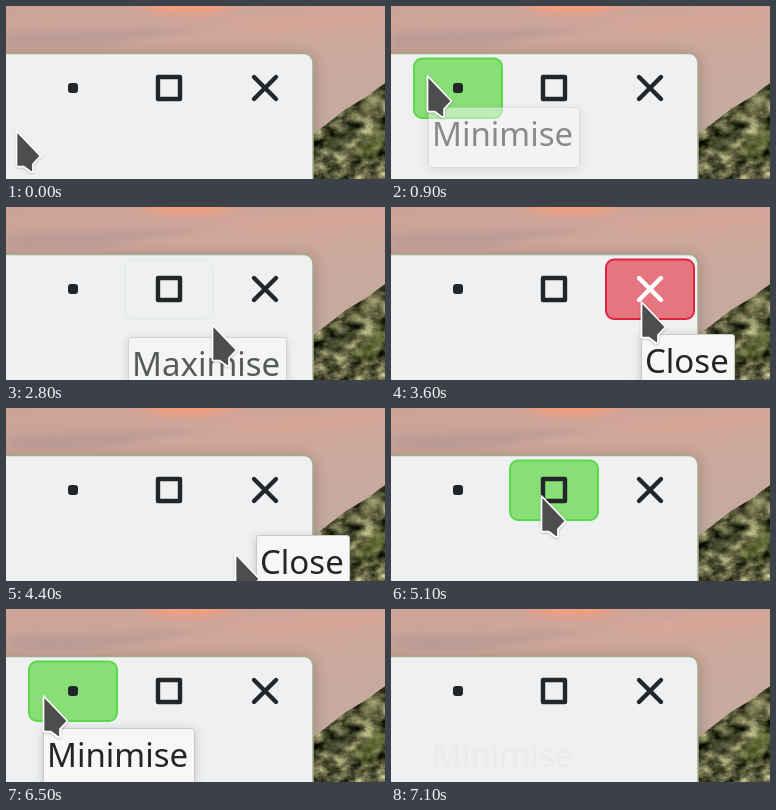
Recreate the animation shown at these times as an HTML page. Size 379x173 px, loop 7.3 s.

```html
<!DOCTYPE html>
<html lang="en">
<head>
<meta charset="utf-8">
<title>Window buttons</title>
<style>
  html, body { margin: 0; width: 100%; height: 100%; overflow: hidden; background: #cba59d; }
  svg { display: block; width: 379px; height: 173px; }
  text { font: 33px "Noto Sans", sans-serif; fill: #232629; }
  .btn { fill: #88df76; stroke: #5dd74b; stroke-width: 2; }
  #close { fill: #e5757f; stroke: #dd2440; }
  .icon { fill: none; stroke: #232629; stroke-width: 4.4; stroke-linejoin: round; }
</style>
</head>
<body>
<svg viewBox="0 0 379 173">
  <defs>
    <linearGradient id="sky" x2=".3" y2="1">
      <stop offset="0" stop-color="#cda297"/>
      <stop offset=".35" stop-color="#cfa79b"/>
      <stop offset="1" stop-color="#c2aca3"/>
    </linearGradient>
    <filter id="soft" x="-20%" y="-100%" width="140%" height="300%"><feGaussianBlur stdDeviation="9 3"/></filter>
    <filter id="blur"><feGaussianBlur stdDeviation="3"/></filter>
    <filter id="glow" x="-10%" y="-20%" width="120%" height="140%"><feGaussianBlur stdDeviation="8"/></filter>
    <filter id="rock" color-interpolation-filters="sRGB">
      <feTurbulence type="fractalNoise" baseFrequency=".07 .09" numOctaves="4" seed="5"/>
      <feColorMatrix values="1.3 0 0 0 -.28  1.25 0 0 0 -.25  1 0 0 0 -.25  0 0 0 0 1"/>
      <feComposite in2="SourceAlpha" operator="in"/>
    </filter>
    <filter id="drop" x="-20%" y="-20%" width="140%" height="150%">
      <feDropShadow dx="0" dy="1" stdDeviation="1" flood-opacity=".25"/>
    </filter>
    <filter id="lift" x="-20%" y="-30%" width="140%" height="170%">
      <feDropShadow dx="0" dy="2" stdDeviation="5" flood-opacity=".2"/>
    </filter>
  </defs>

  <rect width="379" height="173" fill="url(#sky)"/>
  <g filter="url(#soft)">
    <path d="M130 -4H240L205 8L150 7Z" fill="#ef9f80"/>
    <path d="M215 16L379 4V14L260 26Z" fill="#d9a697"/>
    <path d="M0 26L200 22L90 40H0Z" fill="#bb9b95"/>
  </g>
  <path d="M300 134L318 120L340 103L360 91L379 77V173H300Z" filter="url(#rock)"/>
  <g filter="url(#blur)">
    <path d="M379 82L340 108L350 114L379 98Z" fill="#8f8c5e" opacity=".5"/>
    <path d="M318 132L352 110L350 130L322 152Z" fill="#22291a" opacity=".5"/>
    <path d="M379 112L346 148L362 154L379 138Z" fill="#6f7d38" opacity=".5"/>
  </g>

  <rect x="-20" y="50" width="327" height="150" rx="9" fill="#202018" opacity=".32" filter="url(#glow)"/>
  <rect x="-20" y="47.5" width="327" height="150" rx="9" fill="#eff0f1" stroke="#a3ad8c" stroke-width="1.5"/>

  <rect id="min" class="btn" x="23" y="52.500" width="88" height="59.500" rx="8"/>
  <rect id="max" class="btn" x="119" y="52.500" width="88" height="59.500" rx="8"/>
  <rect id="close" class="btn" x="215" y="52.500" width="88" height="59.500" rx="8"/>
  <rect x="62" y="77" width="10" height="10" rx="3" fill="#232629"/>
  <rect class="icon" x="152" y="71" width="22" height="22"/>
  <path id="cross" class="icon" stroke-linecap="round" d="M248 71L270 93M270 71L248 93"/>

  <g id="tip">
    <rect id="box" x=".5" y=".5" height="60" rx="2.500" fill="#f7f7f7" stroke="#c8c9ca" filter="url(#lift)"/>
    <text id="label" x="4" y="39"></text>
  </g>
  <path id="cursor" d="M0 0V35.500H7L14.500 41H16.500V33L24 25Z" fill="#4d4d4d" stroke="#fff" stroke-width="1.700" stroke-linejoin="round" filter="url(#drop)"/>
</svg>
<script>
  const LOOP = 7300, STEP = 100, FADE = 160, MORPH = 200;
  const el = id => document.getElementById(id);
  const clamp = v => Math.min(1, Math.max(0, v));
  const mix = (a, b, p) => a + (b - a) * p;
  const smooth = p => p * p * (3 - 2 * p);
  const easeOut = p => 1 - (1 - p) ** 2.25;

  // The pointer glides from stop to stop and rests between arrive and leave.
  const stops = [
    { arrive: 0, leave: 0, x: 10, y: 125 },
    { arrive: 600, leave: 900, x: 36, y: 70 },
    { arrive: 1600, leave: 2700, x: 147, y: 111 },
    { arrive: 2800, leave: 2800, x: 206, y: 118 },
    { arrive: 3600, leave: 3900, x: 250, y: 95 },
    { arrive: 4400, leave: 4400, x: 229, y: 146 },
    { arrive: 5100, leave: 5300, x: 150, y: 88 },
    { arrive: 5900, leave: 5900, x: 131, y: 138 },
    { arrive: 6300, leave: 6500, x: 37, y: 87 },
    { arrive: 6800, leave: LOOP, x: -40, y: 100 }
  ];
  const visits = [
    { id: "min", on: 100, off: 1400 },
    { id: "max", on: 1400, off: 2650 },
    { id: "close", on: 3300, off: 4050 },
    { id: "max", on: 4700, off: 5950 },
    { id: "min", on: 6100, off: 6600 }
  ];
  const tips = [
    { text: "Minimise", on: 800, off: 1400, x: 37, y: 101, w: 151 },
    { text: "Maximise", on: 1400, off: 2770, x: 122, y: 130, w: 158 },
    { text: "Close", on: 3300, off: 4450, x: 250, y: 127, w: 93 },
    { text: "Minimise", on: 6300, off: 6700, x: 37, y: 119, w: 151 }
  ];

  function pointer(t) {
    const i = stops.findLastIndex(s => s.arrive <= t);
    const a = stops[i], b = stops[i + 1] || a;
    const p = smooth(clamp((t - a.leave) / (b.arrive - a.leave || 1)));
    return [mix(a.x, b.x, p), mix(a.y, b.y, p)];
  }

  function hover(id, t) {
    const levels = visits.filter(v => v.id === id).map(v =>
      clamp((t - v.on) / FADE) * (1 - clamp((t - v.off) / FADE)) ** 2);
    return Math.max(...levels);
  }

  function drawTip(t) {
    const i = tips.findLastIndex(tip => tip.on <= t);
    const tip = tips[Math.max(i, 0)], prev = tips[i - 1];
    const chained = prev && prev.off === tip.on;
    const grow = clamp((t - tip.on) / MORPH);
    const from = chained ? prev : tip;
    const place = key => mix(from[key], tip[key], easeOut(grow));
    el("tip").setAttribute("transform", `translate(${place("x")} ${place("y")})`);
    el("tip").style.opacity = (chained ? 1 : grow) * Math.exp(-Math.max(0, t - tip.off) / 100);
    el("box").setAttribute("width", place("w"));
    el("label").textContent = chained && grow === 0 ? prev.text : tip.text;
  }

  function draw(t) {
    const [x, y] = pointer(t);
    el("cursor").setAttribute("transform", `translate(${x + .5} ${y})`);
    for (const id of ["min", "max", "close"]) {
      const level = hover(id, t);
      el(id).style.fillOpacity = level;
      el(id).style.strokeOpacity = Math.sqrt(level);
    }
    const white = hover("close", t);
    el("cross").style.stroke = `rgb(${[35, 38, 41].map(c => Math.round(mix(c, 255, white)))})`;
    drawTip(t);
  }

  const start = performance.now();
  function tick() {
    const t = (performance.now() - start) % LOOP;
    draw(Math.floor(t / STEP) * STEP);
    requestAnimationFrame(tick);
  }
  tick();
</script>
</body>
</html>
```
